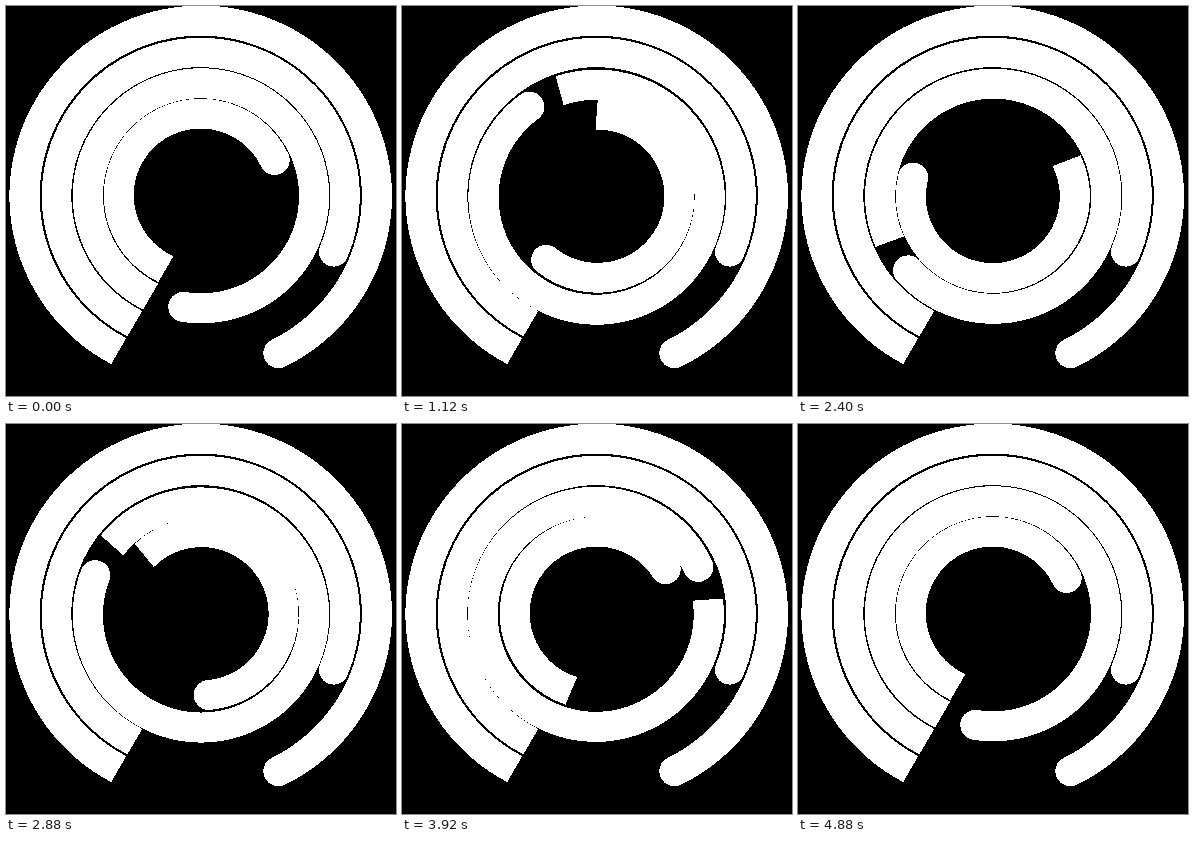
These frames come from a looping animation (390 px wide and 390 px high, 4.96 s). An HTML page:

```html
<!DOCTYPE html>
<html lang="en">
<head>
<meta charset="utf-8">
<title>Rotating arcs</title>
<style>
html, body { margin: 0; width: 100%; height: 100%; overflow: hidden; background: #000; }
svg { display: block; width: 100vw; height: 100vh; fill: #fff; shape-rendering: crispEdges; }
</style>
</head>
<body>
<svg id="stage" viewBox="0 0 390 390"></svg>
<script>
const LOOP = 4960, STEP = 80;
const CUT_ANGLE = 120, CUT_OFFSET = 7;
const SQUASH = 0.995;
const stage = document.getElementById('stage');

// x, y: pivot; dx, dy: arc centre from the pivot; keys: [time in ms, degrees]
const rings = [
  { x: 194.7, y: 189.9, r: 176.2, w: 30.2, end: 63.8 },
  { x: 194.8, y: 190, r: 144.3, w: 29.6, end: 23 },
  { x: 194.5, y: 190.4, r: 113.1, w: 30.2, end: 99, dx: 0.5, dy: -0.6,
    keys: [[0, 0], [1440, 635.8], [4880, 1080]] },
  { x: 195, y: 189.8, r: 82, w: 30, end: -25.5, dx: -0.3, dy: -0.6,
    keys: [[0, 0], [1440, -264.5], [2840, -609.5], [3600, -609.5], [4880, -1080]] }
];

function polar(r, deg) {
  const a = deg * Math.PI / 180;
  return (r * Math.cos(a)).toFixed(2) + ' ' + (r * Math.sin(a)).toFixed(2);
}

// The flat end lies on a line that passes beside the centre.
function cutAngle(r) {
  return CUT_ANGLE - Math.asin(CUT_OFFSET / r) * 180 / Math.PI;
}

function arcPath({ r, w, end }) {
  const outer = r + w / 2, inner = r - w / 2, cap = w / 2;
  return `M${polar(outer, cutAngle(outer))}` +
    `A${outer} ${outer} 0 1 1 ${polar(outer, end)}` +
    `A${cap} ${cap} 0 0 1 ${polar(inner, end)}` +
    `A${inner} ${inner} 0 1 0 ${polar(inner, cutAngle(inner))}Z`;
}

function valueAt(keys, t) {
  for (let i = 1; i < keys.length; i++) {
    const [t0, v0] = keys[i - 1], [t1, v1] = keys[i];
    if (t <= t1) return v0 + (v1 - v0) * (t - t0) / (t1 - t0);
  }
  return keys[keys.length - 1][1];
}

function place({ el, x, y, dx = 0, dy = 0, keys }, t) {
  const turn = keys ? valueAt(keys, t) : 0;
  el.setAttribute('transform',
    `translate(${x} ${y}) scale(1 ${SQUASH}) rotate(${turn}) translate(${dx} ${dy})`);
}

for (const ring of rings) {
  ring.el = document.createElementNS('http://www.w3.org/2000/svg', 'path');
  ring.el.setAttribute('d', arcPath(ring));
  stage.append(ring.el);
  place(ring, 0);
}

const moving = rings.filter(ring => ring.keys);
const start = performance.now();

function draw() {
  const t = (performance.now() - start) % LOOP;
  const held = Math.floor(t / STEP) * STEP;
  moving.forEach(ring => place(ring, held));
  requestAnimationFrame(draw);
}
draw();
</script>
</body>
</html>
```
